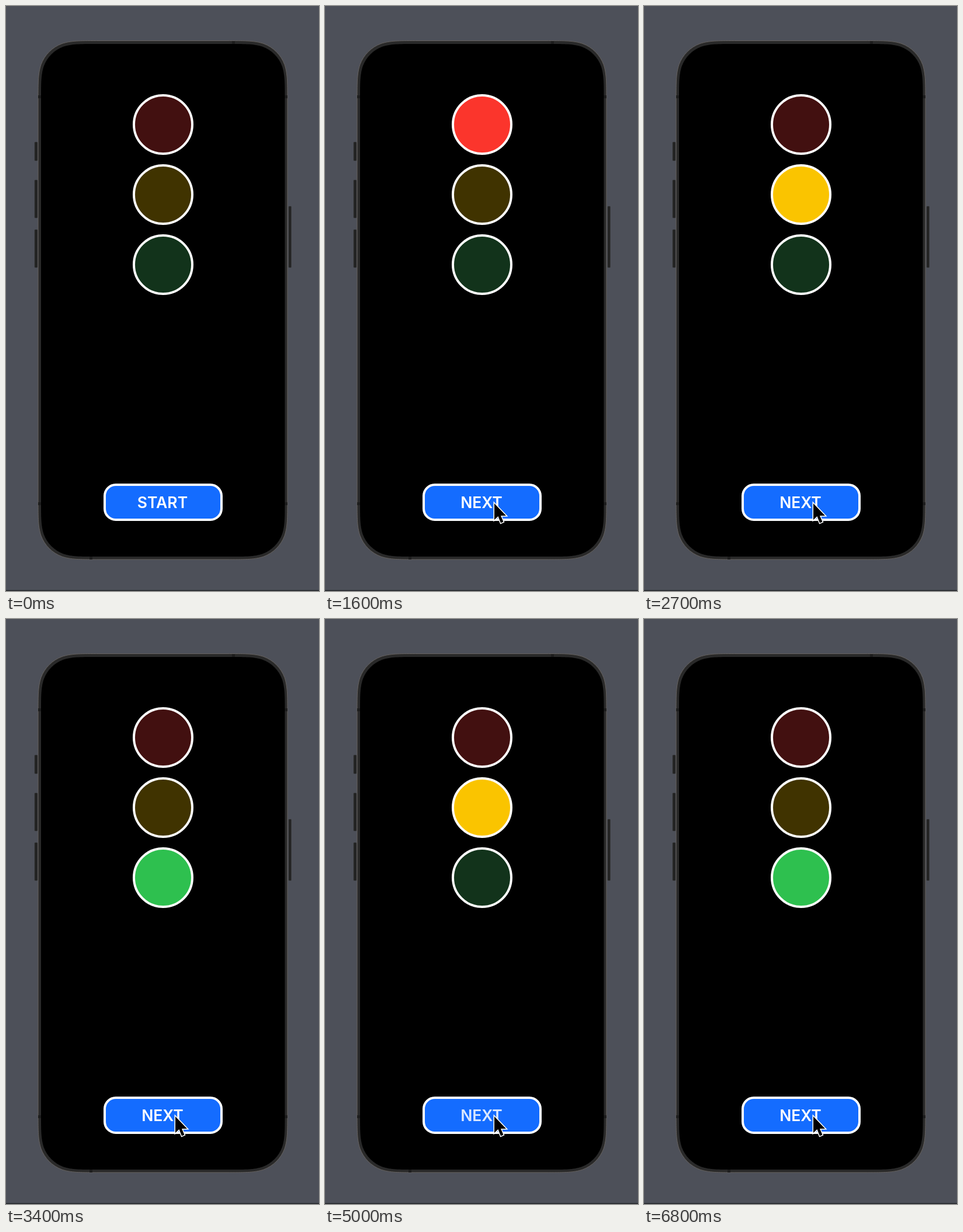
An HTML page that plays this animation: 536 px wide and 1002 px high, repeating every 6.9 s.

```html
<!DOCTYPE html>
<html lang="en">
<head>
<meta charset="utf-8">
<title>Traffic light</title>
<style>
  html, body { margin: 0; height: 100%; overflow: hidden; background: #4d5059; }
  svg { display: block; width: 100%; height: 100%; }
  text { font: 600 26.5px Inter, "Open Sans", sans-serif; text-anchor: middle; fill: #fff; }
  .outlined { stroke: #fff; stroke-width: 4; }
</style>
</head>
<body>
<svg viewBox="0 0 536 1002">
  <rect width="536" height="1002" fill="#4d5059"/>
  <rect y="1000.5" width="536" height="1.5" fill="#25272b"/>
  <g fill="#232323" stroke="#393939" stroke-width=".5">
    <rect x="49" y="233" width="5" height="32" rx="1"/>
    <rect x="49" y="298" width="5" height="65" rx="1"/>
    <rect x="49" y="383" width="5" height="65" rx="1"/>
    <rect x="484" y="343" width="4.5" height="105" rx="1"/>
  </g>
  <path id="body" fill="#292929" stroke="#66625f"/>
  <g fill="#1d1d1d">
    <rect x="55" y="153" width="5" height="5"/>
    <rect x="477" y="153" width="5" height="5"/>
    <rect x="55" y="850" width="5" height="5"/>
    <rect x="477" y="850" width="5" height="5"/>
    <rect x="387" y="60" width="5" height="5"/>
    <rect x="143" y="943" width="5" height="5"/>
  </g>
  <path id="screen"/>
  <g id="lights" class="outlined">
    <circle cx="269" cy="203" r="50"/>
    <circle cx="269" cy="323" r="50"/>
    <circle cx="269" cy="443" r="50"/>
  </g>
  <rect class="outlined" x="169" y="820" width="200" height="60" rx="19" fill="#146cff"/>
  <text id="label" x="268" y="860"></text>
  <path id="cursor" d="M0 1V29L6.5 23L11 34.5L15.5 32.5L11 22H20Z"
        stroke="#fff" stroke-width="3" paint-order="stroke"/>
</svg>
<script>
const LOOP = 6900, STEP = 100;
const CLICKS = [1200, 2100, 2900, 3900, 4800, 5800];
const PRESS = 100, RECOVER = 250;
const OFF = ['#421010', '#403300', '#12331b'];
const ON = ['#fb352c', '#fac400', '#2ec04f'];
const byId = id => document.getElementById(id);
const lights = [...byId('lights').children];

// Rounded rectangle with continuous-curvature corners.
function squircle(left, top, right, bottom, radius) {
  const corner = [[0, 1.529], [0, 1.088], [0, .868], [.075, .631], [.169, .373],
    [.373, .169], [.631, .075], [.868, 0], [1.088, 0], [1.529, 0]];
  const place = (points, flipX, flipY) => points.map(([x, y]) =>
    (flipX ? right - x * radius : left + x * radius) + ' ' +
    (flipY ? bottom - y * radius : top + y * radius));
  const back = [...corner].reverse();
  return [place(corner, 0, 0), place(back, 1, 0), place(corner, 1, 1), place(back, 0, 1)]
    .map(([start, ...curve], i) => (i ? 'L' : 'M') + start + 'C' + curve.join(' '))
    .join('') + 'Z';
}

function labelOpacity(time) {
  return CLICKS.reduce((opacity, click) => {
    const age = time - click;
    if (age < -PRESS || age >= RECOVER) return opacity;
    return .2 + .8 * Math.max(0, age) / RECOVER;
  }, 1);
}

function draw(now) {
  const time = Math.floor(now % LOOP / STEP) * STEP;
  const clicks = CLICKS.filter(click => click <= time).length;
  lights.forEach((light, i) =>
    light.setAttribute('fill', clicks && (clicks - 1) % 3 === i ? ON[i] : OFF[i]));

  byId('label').textContent = clicks ? 'NEXT' : 'START';
  byId('label').setAttribute('opacity', labelOpacity(time));

  const progress = Math.min(1, Math.max(0, (time - 100) / 600));
  const away = (1 - progress) ** 2;
  byId('cursor').setAttribute('transform', `translate(${290 + 59 * away} ${851 + 63 * away})`);
  byId('cursor').setAttribute('visibility', time < 100 ? 'hidden' : 'visible');
}

byId('body').setAttribute('d', squircle(55, 59.5, 482, 948, 65));
byId('screen').setAttribute('d', squircle(60, 65, 477.5, 943, 61));

function tick() {
  draw(performance.now());
  requestAnimationFrame(tick);
}
tick();
</script>
</body>
</html>
```
